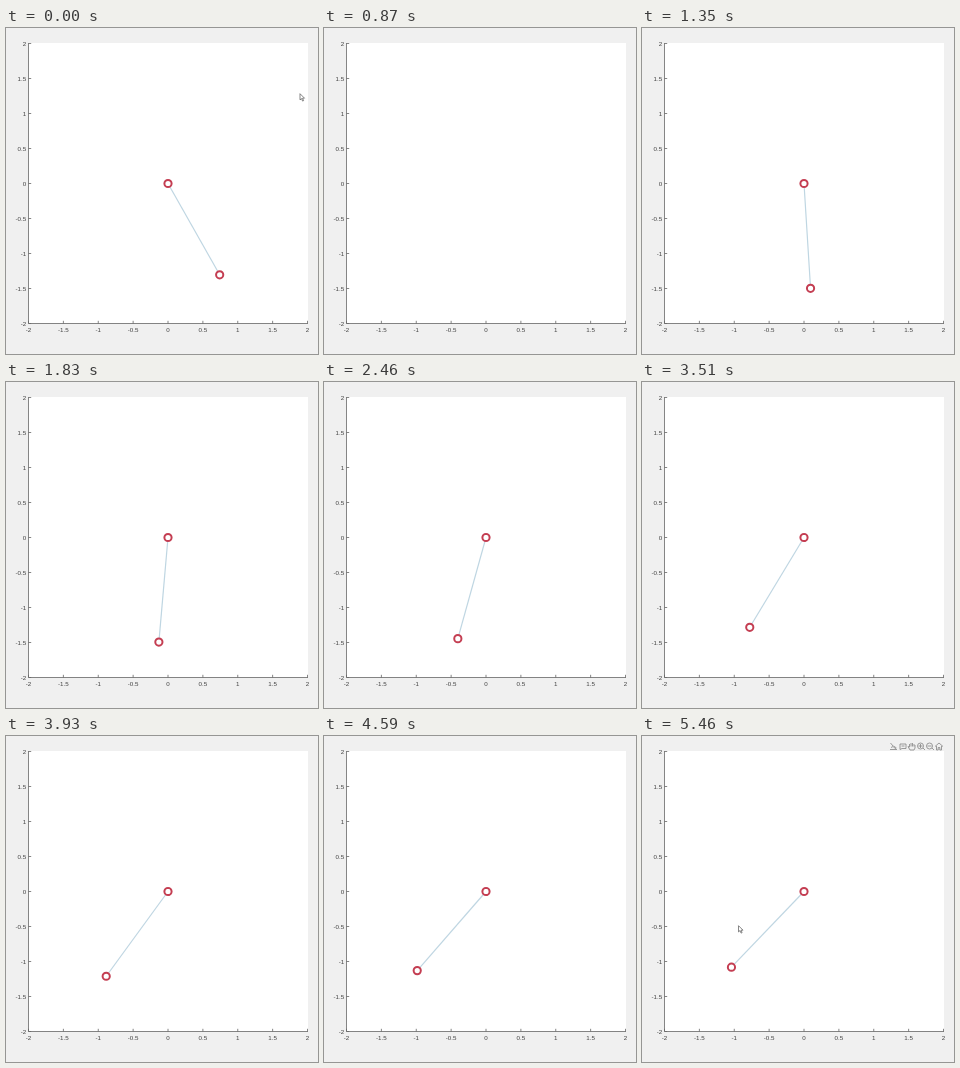
Animation, 312 px wide and 326 px high, one loop 5520 ms. Source, as an HTML page:

```html
<!DOCTYPE html>
<html lang="en">
<head>
<meta charset="utf-8">
<title>Pendulum plot</title>
<style>
  html, body { margin: 0; width: 100%; height: 100%; overflow: hidden; background: #f0f0f0; }
  svg { display: block; width: 312px; height: 326px; }
  text { font: 6.2px "Liberation Sans", Arial, sans-serif; fill: #404040; }
  .axis { fill: none; stroke: #666; stroke-width: .8; }
  .rod { stroke: #bfd6e2; stroke-width: 1.2; }
  .ring { fill: #fff; stroke: #c43e52; stroke-width: 2; }
  #tools { fill: none; stroke: #858585; stroke-width: .8; }
  #cursor { fill: #fff; stroke: #555; stroke-width: .7; stroke-linejoin: round; }
</style>
</head>
<body>
<svg viewBox="0 0 312 326">
  <rect width="312" height="326" fill="#f0f0f0"/>
  <rect x="22" y="15" width="280" height="280.5" fill="#fff"/>
  <path class="axis" d="M22.5 15V295.5H302"/>
  <g id="scale"></g>
  <g id="plot">
    <line class="rod" id="rod" x1="162" y1="155.5"/>
    <circle class="ring" cx="162" cy="155.5" r="3.6"/>
    <circle class="ring" id="bob" r="3.6"/>
  </g>
  <g id="tools">
    <path d="M248 13.5h7M249 11.5l2-1 3 2.500M251 10l-2.500-3M251.500 10l3 2"/>
    <path d="M258 8h6v4.500h-4l-2 1zM259.500 10h3"/>
    <path d="M268 14l-2-3.500 1.500.5V8M269 10.500V7M270.500 10.500V7M272 10.500V8M273 9v3l-1 2h-4"/>
    <path d="M281 12l2 2M276.500 10h4M278.500 8v4"/><circle cx="278.500" cy="10" r="3"/>
    <path d="M290 12l2 2M285.500 10h4"/><circle cx="287.500" cy="10" r="3"/>
    <path d="M293 10.500l4-3.500 4 3.500M294.500 10v4h1.700v-2.500h1.600V14h1.700v-4"/>
  </g>
  <path id="cursor" d="M0 0V6.200L1.500 4.900 2.600 7.400 3.600 6.900 2.500 4.500H4.500Z"/>
</svg>
<script>
  const LOOP = 5520, STEP = 30, UNIT = 69.75, LENGTH = 1.5;
  const ORIGIN = { x: 162, y: 155.5 };
  const $ = id => document.getElementById(id);

  // Time in ms, angle from straight down in degrees
  const swing = [[0, 29.6], [1830, -5], [3030, -24.4], [3930, -36.2], [4590, -41.1], [5460, -43.9]];
  const holds = [[1470, 1620], [3210, 3330]];
  const blank = [870, 990];

  const within = (t, [from, to]) => t >= from && t < to;
  const mix = (a, b, k) => a + (b - a) * k;
  const progress = (t, from, to) => Math.min(1, Math.max(0, (t - from) / (to - from)));

  const gradient = (a, b) => (b[1] - a[1]) / (b[0] - a[0]);
  const slopes = swing.map((p, i) => {
    const before = swing[i - 1], after = swing[i + 1];
    if (!before) return -0.0195;
    if (!after) return -0.0015;
    const w = (p[0] - before[0]) / (after[0] - before[0]);
    return mix(gradient(before, p), gradient(p, after), w);
  });

  function angleAt(t) {
    t = Math.min(t, swing[swing.length - 1][0]);
    let i = 0;
    while (i < swing.length - 2 && t > swing[i + 1][0]) i++;
    const [t0, a0] = swing[i], [t1, a1] = swing[i + 1];
    const span = t1 - t0, u = (t - t0) / span, v = 1 - u;
    return a0 * (1 + 2 * u) * v * v + slopes[i] * span * u * v * v
         + a1 * u * u * (3 - 2 * u) - slopes[i + 1] * span * u * u * v;
  }

  function buildScale() {
    let marks = "";
    for (let n = -2; n <= 2; n += 0.5) {
      const x = ORIGIN.x + n * UNIT, y = ORIGIN.y - n * 70;
      marks += `<path class="axis" d="M${x} 295.5v-2.700M22.500 ${y}h2.700"/>`
        + `<text x="${x}" y="304" text-anchor="middle">${n}</text>`
        + `<text x="20.200" y="${y + 2.3}" text-anchor="end">${n}</text>`;
    }
    $("scale").innerHTML = marks;
  }

  function drawPendulum(t) {
    const hold = holds.find(h => within(t, h));
    const angle = angleAt(hold ? hold[0] : t) * Math.PI / 180;
    const x = ORIGIN.x + Math.sin(angle) * LENGTH * UNIT;
    const y = ORIGIN.y + Math.cos(angle) * LENGTH * 70;
    $("rod").setAttribute("x2", x);
    $("rod").setAttribute("y2", y);
    $("bob").setAttribute("cx", x);
    $("bob").setAttribute("cy", y);
    $("plot").style.visibility = within(t, blank) ? "hidden" : "visible";
  }

  function drawPointer(t) {
    let x = 330, y = 70;
    if (t < 270) {
      const k = progress(t, 0, 240) ** 2;
      x = mix(294, 316, k);
      y = mix(65.7, 70, k);
    } else if (t >= 4980) {
      const k = 1 - (1 - progress(t, 4980, 5430)) ** 2;
      x = mix(8, 96.5, k);
      y = mix(206, 189.7, k);
    }
    $("cursor").setAttribute("transform", `translate(${x} ${y})`);
    $("tools").style.opacity = progress(t, 5070, 5220);
  }

  function frame() {
    const t = Math.floor(performance.now() % LOOP / STEP) * STEP;
    drawPendulum(t);
    drawPointer(t);
    requestAnimationFrame(frame);
  }

  buildScale();
  frame();
</script>
</body>
</html>
```
